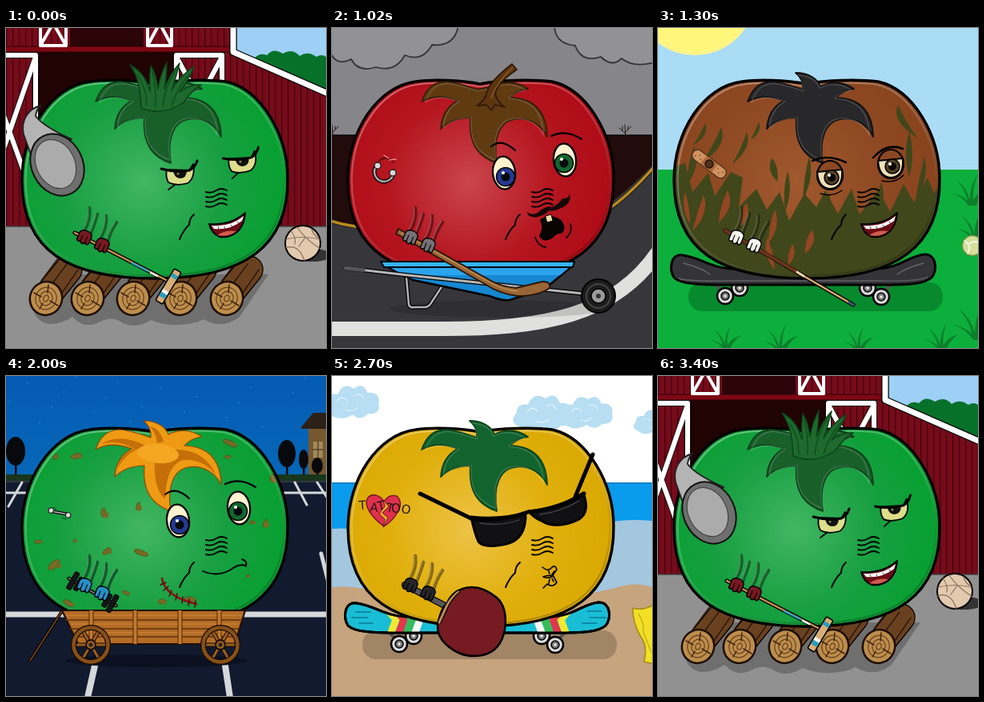
An HTML page that plays this animation: 400 by 400 pixels, repeating every 3500 ms.

```html
<!DOCTYPE html>
<html lang="en">
<head>
<meta charset="utf-8">
<title>Tomatoes</title>
<style>
html, body { margin: 0; width: 100%; height: 100%; overflow: hidden; }
svg { display: block; width: 100vw; height: 100vh; }
</style>
</head>
<body>
<script>
const BODY = 'M185 70C160 65 125 64 105 67C56 73 20 130 20 190C20 279 78 313 186 313C300 313 353 272 352 188C352 135 320 77 275 67C250 64 210 65 185 70Z';
const LEAF = 'C216 66 232 67 245 76C236 77 228 81 223 87C250 88 268 102 269 136C262 121 246 111 228 114C209 117 201 139 206 169C186 162 170 148 173 112C158 112 146 116 136 126C137 110 144 98 157 91C142 85 126 84 112 92C118 76 126 68 141 67C156 68 169 73 181 77';
const TUFT = 'M203 73' + LEAF + 'C182 69 179 62 172 56C188 56 199 63 203 73Z';
const CAP = 'M203 73' + LEAF + 'Z';

// Small SVG helpers
const path = (d, fill = 'none', stroke = '#000', w = 2, more = '') =>
  `<path d="${d}" fill="${fill}" stroke="${stroke}" stroke-width="${w}" ${more}/>`;
const fill = (d, c, more = '') => `<path d="${d}" fill="${c}" ${more}/>`;
const line = (d, w = 2, c = '#000') => path(d, 'none', c, w);
const rect = (x, y, w, h, c) => `<rect x="${x}" y="${y}" width="${w}" height="${h}" fill="${c}"/>`;
const oval = (x, y, rx, ry, c, stroke = 'none', w = 0, turn = 0) =>
  `<ellipse cx="${x}" cy="${y}" rx="${rx}" ry="${ry}" fill="${c}" stroke="${stroke}" stroke-width="${w}" transform="rotate(${turn} ${x} ${y})"/>`;
const disc = (x, y, r, c, stroke, w) => oval(x, y, r, r, c, stroke, w);
const at = (x, y, turn, s) => `<g transform="translate(${x} ${y}) rotate(${turn})">${s}</g>`;
const range = (n, f) => Array.from({ length: n }, (_, i) => f(i)).join('');
const outlined = (d, c, w) => line(d, w + 2.5) + line(d, w, c);

function body(id, light, main, edge, marks = '') {
  return `<radialGradient id="g${id}" gradientUnits="userSpaceOnUse" cx="172" cy="192" r="185">
    <stop offset="0" stop-color="${light}"/><stop offset=".55" stop-color="${main}"/><stop offset="1" stop-color="${edge}"/></radialGradient>`
    + fill(BODY, `url(#g${id})`)
    + `<g clip-path="url(#skin)">${marks}</g>`
    + `<g transform="translate(186 190) scale(.972) translate(-186 -190)">${path(BODY, 'none', 'url(#bevel)', 2.2, 'filter="url(#soft)"')}</g>`
    + path(BODY, 'none', '#000', 3.4);
}

const leaf = (d, c, dark) => path(d, c, dark, 1.8)
  + `<g transform="translate(190 105) scale(.94) translate(-190 -105)">${path(d, 'none', '#fff', 1.5, 'opacity=".16" filter="url(#soft)"')}</g>`;

const ARMS = 'M104 225Q106 240 97 254M114 233Q111 244 106 256M125 235Q126 250 117 264M138 243Q131 253 127 266';
const arms = c => line(ARMS, 4.5, '#0007') + `<g transform="translate(-1.5 -1)">${line(ARMS, 1.2, '#fff5')}</g>` + line(ARMS, 2, c);

const hand = (x, y, c) => at(x, y, 22,
  path('M-8 -4C-7 -10 5 -11 8 -5L8 3C8 8 4 8 3 5C2 9 -3 9 -3 5C-5 8 -9 7 -8 3Z', c, '#000', 1.4)
  + line('M-3 -2V5M3 -2V5', 1.1));
const hands = c => hand(98, 262, c) + hand(120, 272, c);

const nose = range(4, i => line(`M250 ${205 + i * 6}q7 2 13 -2t13 0`, 1.9));
const cheek = line('M235 233Q229 238 229 246Q222 252 217 264', 2);

const roundEye = (x, y, iris, dx, dy) => oval(x, y, 14, 20.5, '#fff3cf', '#000', 2.3, -6)
  + disc(x + dx, y + dy, 11.5, iris, '#000', 1.5) + disc(x + dx, y + dy, 5.5, '#05080c')
  + disc(x + dx - 3, y + dy - 5, 2, '#fff');
const wideEyes = roundEye(215, 181, '#233a93', 2, 5) + roundEye(291, 165, '#12672f', -1, 4)
  + line('M199 148Q212 137 229 153M274 135Q292 126 312 139', 2.2);

const grin = path('M254 245Q281 247 299 231Q298 246 290 254Q280 263 267 261Q257 257 254 245Z', '#6d0d14', '#000', 2)
  + fill('M257 247Q281 249 297 235L295 241Q280 253 260 251Z', '#fff')
  + line('M265 248l1 3M273 248l1 3M281 246l2 3M289 242l2 3', .7)
  + fill('M264 259Q275 252 288 254Q278 262 264 259Z', '#cf5c4e');

const wheel = (x, y) => disc(x, y, 10, '#ddd', '#000', 2.5) + disc(x, y, 5, '#777', '#000', 1.5) + disc(x, y, 1.8, '#eee');
const DECK = 'M31 284C16 281 13 302 20 312C28 320 50 321 88 321H278C315 321 333 320 342 312C350 303 348 282 333 283C313 285 304 299 275 301H92C66 300 53 287 31 284Z';
function board(c, shade, trim) {
  return `<rect x="38" y="318" width="318" height="36" rx="17" fill="${shade}"/>`
    + line('M72 321l10 10h14l10-10M257 321l10 10h14l10-10', 4, '#555')
    + wheel(102, 325) + wheel(262, 325) + wheel(279, 336)
    + wheel(84, 335) + path(DECK, c, '#000', 3) + trim;
}

function barn() {
  const slats = range(51, i => rect(i * 8, 0, 1.3, 248, '#430510'));
  const log = x => outlined(`M${x + 3} 333L${x + 28} 302`, '#6a4120', 33)
    + line(`M${x - 6} 316l24 -32M${x + 6} 322l20 -27M${x + 18} 334l22 -32`, 1.4, '#2b1708')
    + oval(x, 338, 20, 21, '#bd8d4c', '#1c0e04', 2.5, 25)
    + [13, 8, 3].map(r => oval(x, 338, r, r + 1, 'none', '#65401d', 1.2, 25)).join('')
    + line(`M${x - 15} 331l9 5M${x + 5} 341l10 6M${x + 3} 321l-1 10M${x - 8} 351l4 -7`, 1.5, '#3e230e');
  const frame = (x, w) => path(`M${x} -8H${x + w}V22H${x}ZM${x} 22L${x + w / 2} -6L${x + w} 22`, 'none', '#fff', 4);
  const door = 'M0 34H37V248M37 36L-2 148M-2 112L40 228M213 248V34H270V248M214 38L269 140M269 38L214 140';
  const spikes = fill('M169 100C168 78 166 62 155 46C171 55 176 66 180 79Q179 62 181 47Q188 58 190 76Q193 58 201 43Q201 59 198 76Q205 57 217 44Q213 60 207 78Q217 60 235 48Q229 64 217 80Q230 70 244 71Q231 79 222 93Q196 111 169 100Z', '#1d6a2c', 'stroke="#0c4219" stroke-width="1.5"')
    + line('M176 97Q176 77 165 59M187 98Q188 74 183 55M196 98Q198 75 211 55M207 97Q214 75 229 58', 1.3, '#0f481d');
  // Heavy lid that dips towards the nose and rises at the outer end
  const squint = (x, y, turn) => at(x, y, turn,
    path('M-15 -6L13 -5L18 -13Q21 4 11 11Q-3 15 -13 10Q-17 3 -15 -6Z', '#dddd8b', '#000', 1.8)
    + fill('M-7 -5H10Q10 5 1 5Q-6 4 -7 -5Z', '#111') + disc(-1, -1, 1.5, '#898a4c')
    + line('M-22 -7Q-4 -2 13 -5Q20 -8 23 -17', 3) + line('M-13 19l8 -6', 1.8));
  return rect(0, 0, 400, 400, '#760b1a') + slats
    + rect(80, 0, 92, 23, '#2b0508') + rect(0, 23, 282, 7, '#7e0713') + rect(41, 30, 172, 218, '#200303')
    + line('M0 23H282M0 30H282', 1, '#2a0409')
    + frame(43, 32) + frame(177, 30)
    + line(door, 8, '#111') + line(door, 6, '#fff')
    + fill('M284 0H400V80L284 31Z', '#9dd0f4')
    + fill('M308 44Q313 29 326 34Q334 24 346 32Q358 25 367 35Q377 28 388 36Q396 31 402 38V84Z', '#07712a')
    + outlined('M284 -5V30L405 83', '#fff', 7)
    + rect(0, 248, 400, 152, '#919191') + line('M0 248H400', 1.5, '#3c3c3c')
    + fill('M34 342Q32 366 54 370Q70 370 83 361Q99 378 118 367Q132 360 143 367Q161 378 181 365Q197 372 216 371Q236 370 247 364Q270 378 292 361L328 308H70Z', '#6f6f6f')
    + [50, 102, 159, 218, 276].map(log).join('')
    + oval(383, 284, 23, 8, '#333')
    + disc(371, 269, 22, '#e3c9ae', '#000', 2)
    + line('M350 264Q370 259 392 264M349 275Q366 269 373 291M364 249Q374 264 393 276M356 253Q363 262 361 270M374 262L366 273M382 251Q384 259 390 262', 1.2, '#85705c')
    + body('a', '#43b663', '#179f41', '#05a02f')
    + leaf(CAP, '#195f2a', '#0c4219') + spikes
    + path('M43 97C28 101 18 115 22 133L31 158L82 139C62 130 45 121 37 110Q38 102 43 97Z', '#b4b4b4', '#222', 2)
    + oval(64, 171, 32, 40, '#6f6f6f', '#111', 2, -26) + oval(62, 170, 24, 32, '#ababab', '#444', 1.2, -26)
    + arms('#126c2a')
    + squint(216, 183, 0) + squint(294, 168, -5)
    + nose + cheek + grin
    + outlined('M86 256L200 315', '#c69450', 2.5) + line('M158 294l20 10', 2.5, '#2ca3c8') + line('M181 306l8 4', 2.5, '#fff')
    + at(203, 323, -59, `<rect x="-23" y="-5" width="46" height="10" rx="2" fill="#d8ae78" stroke="#000" stroke-width="1.6"/>`
      + rect(-16, -4, 6, 8, '#279ebd') + rect(-10, -4, 4, 8, '#fff') + rect(12, -4, 5, 8, '#279ebd'))
    + hands('#781820');
}

function road() {
  const cloud = d => path(d, '#929196', '#343438', 1.8);
  const twig = (x, y) => line(`M${x} ${y}l-1 -13M${x} ${y - 4}l7 -7M${x} ${y - 2}l-8 -7M${x + 3} ${y - 7}l0 -4M${x - 4} ${y - 6}l0 -5`, 1, '#211513');
  const verge = 'M-2 241Q25 250 60 250M340 230Q370 211 403 173';
  const leg = 'M93 312L96 346Q97 350 103 349H117Q122 348 125 342L142 316';
  return rect(0, 0, 400, 400, '#85858a')
    + cloud('M-3 27Q3 49 24 39Q33 56 55 49Q79 56 91 34Q113 43 125 21Q153 24 158 -3H-3Z')
    + cloud('M278 -3Q279 20 304 22Q312 44 336 36Q350 50 362 38Q376 50 403 43V-3Z')
    + rect(0, 134, 400, 130, '#210b0b') + line('M0 134H400', 1.5, '#0b0505') + twig(1, 134) + twig(367, 134)
    + fill('M0 241Q30 250 60 250H300Q352 222 400 172V400H0Z', '#36363b')
    + line(verge, 5, '#111') + line(verge, 3.5, '#b88a20')
    + line('M-5 376H130C266 377 354 359 408 279', 18, '#e0e0df')
    + oval(210, 351, 138, 11, '#0002')
    + body('b', '#cb464c', '#b51620', '#ae0a15')
    + leaf(CAP, '#603a10', '#352008')
    + path('M181 97Q192 91 194 79Q197 67 225 45L231 52Q207 68 204 82Q207 93 216 99L204 96L199 103L193 96Z', '#5c3510', '#2e1a06', 1.8)
    + line('M199 88Q203 72 226 49', 1.2, '#916028')
    + line('M59 166A12 12 0 0 1 77 168', 2, '#5b060c') + outlined('M56 172A12 12 0 1 0 77 179', '#aaa', 2.5)
    + disc(57, 172, 4, '#d9d9d9', '#222', 1.3) + disc(76, 181, 4, '#d9d9d9', '#222', 1.3) + line('M65 159l6 4M72 165l8 -1', 1.4, '#f0888b')
    + arms('#7f1018') + wideEyes + nose + cheek
    + fill('M244 230Q250 235 257 231Q268 221 275 224Q284 220 288 213Q296 214 297 207Q300 220 286 225Q277 230 272 228Q259 239 250 236Q244 235 244 230Z', '#160808')
    + path('M261 240Q273 232 286 241Q293 251 286 256Q280 255 275 262Q265 268 260 260Q266 249 261 240Z', '#090304', '#000', 2)
    + path('M267 235l7 -2 2 8 -7 2Z', '#f1ddb0', '#000', 1)
    + line('M254 262Q258 273 267 274M293 262Q301 255 298 245', 1.8)
    + outlined(leg, '#b5b5b5', 2.5)
    + path('M66 297H301L266 326L222 340Q211 341 197 335L101 315Z', '#1687d0', '#000', 2.5)
    + fill('M72 299H297L285 309H90Z', '#2ba4ed')
    + path('M61 292H303L301 299H65Z', '#35b4f4', '#000', 2)
    + outlined('M17 300L95 309L333 334', '#b7b7b7', 3) + line('M17 300L39 302.5', 5, '#555')
    + disc(333, 335, 21, '#1c1c1d', '#000', 2) + disc(333, 335, 15, 'none', '#454545', 2) + disc(333, 335, 9, '#9b9b9b', '#000', 1.5) + disc(333, 335, 3, '#333')
    + path('M83 251L197 315Q210 323 230 325L263 317Q274 317 272 325Q258 335 232 335Q211 333 191 320L80 257Z', '#986535', '#2b1607', 2)
    + line('M87 256L198 318Q215 328 232 329', 1.2, '#c99355')
    + hands('#777176');
}

function lawn() {
  const tuft = (x, y, s) => `<g transform="translate(${x} ${y}) scale(${s})">`
    + fill('M0 0Q-8 -13 -25 -18Q-10 -15 -1 -7Q-6 -25 -17 -36Q-2 -25 2 -8Q2 -29 13 -43Q5 -25 7 -8Q14 -21 31 -25Q16 -15 11 0Z', '#0c7f2b') + '</g>';
  const streak = (x, y, h, w, lean) => `M${x} ${y}Q${x - w} ${y + h / 2} ${x - lean} ${y + h}Q${x + w} ${y + h / 2} ${x} ${y}`;
  const green = [[79, 124, 45, 9, 25], [59, 119, 28, 6, 15], [111, 130, 40, 7, 18], [126, 118, 22, 5, 10], [45, 147, 48, 9, 8], [143, 162, 30, 9, -6], [162, 179, 50, 7, 3], [189, 160, 55, 7, 8], [300, 96, 42, 9, -25], [314, 130, 56, 8, 0], [279, 193, 42, 8, 7], [333, 160, 55, 7, 11], [213, 205, 30, 6, 3]];
  const rust = [[57, 208, 46, 8, 14], [87, 203, 40, 10, 11], [110, 218, 30, 8, 6], [146, 227, 42, 8, 8], [192, 252, 30, 9, 8], [137, 262, 40, 8, -9], [168, 270, 27, 7, 5], [34, 205, 40, 6, -6]];
  const marks = fill('M0 320V180L34 169L43 205L63 181L71 210L91 180L106 187L101 224L123 201L136 227L152 205L164 241L183 207L198 224L209 203L225 232L242 201L252 233L276 202L290 230L307 195L320 218L337 187L345 207L360 180V320Z', '#40471a')
    + fill(green.map(a => streak(...a)).join(''), '#40471a') + fill(rust.map(a => streak(...a)).join(''), '#934623');
  const sly = (x, y) => oval(x, y, 16, 18, '#8b4824', '#000', 2.2) + path(`M${x - 16} ${y - 4}L${x + 15} ${y - 7}Q${x + 17} ${y + 16} ${x} ${y + 17}Q${x - 15} ${y + 16} ${x - 16} ${y - 4}Z`, '#eee0b8', '#000', 2.2)
    + disc(x + 2, y + 3, 9, '#544127', '#000', 1.5) + disc(x + 2, y + 3, 5, '#080604') + disc(x - 1, y, 2, '#fff');
  return rect(0, 0, 400, 180, '#abdcf6') + disc(46, -42, 76, '#fff48a') + disc(46, -42, 72, '#fff67c')
    + rect(0, 177, 400, 223, '#0caf3c')
    + tuft(388, 222, .9) + tuft(394, 266, .9) + tuft(82, 402, .7) + tuft(150, 405, .8) + tuft(248, 404, .7) + tuft(351, 403, .8) + tuft(394, 390, 1.1)
    + disc(393, 272, 12.5, '#d5e09a', '#799047', 1.5) + line('M383 266Q393 272 387 282M388 270Q397 264 403 270', 1.4, '#fff')
    + board('#343438', '#078a2d', line('M32 294Q55 300 65 308M332 294Q309 300 299 308', 1.3, '#66666a') + line('M26 313Q35 317 90 316H276Q329 317 337 311', 1.4, '#626266'))
    + body('c', '#a1592e', '#8f4a23', '#88431d', marks)
    + leaf(TUFT, '#28282b', '#111113')
    + at(64, 170, 37, '<rect x="-25" y="-7" width="50" height="14" rx="7" fill="#cf935f" stroke="#563318" stroke-width="1.5"/>'
      + rect(-9, -6, 18, 12, '#a96c3f') + disc(0, 0, 5, '#533018', '#241308', 1.5) + range(6, i => disc(i < 3 ? -20 + i * 4 : 12 + (i - 3) * 4, i % 2 ? -2 : 2, .8, '#704322')))
    + arms('#343a16') + sly(215, 184) + sly(291, 170)
    + line('M193 166Q212 157 235 168M269 162Q286 143 306 151', 2.5) + line('M203 207Q217 212 230 203M280 191Q296 195 307 184', 1.4)
    + nose + cheek + grin
    + outlined('M84 253L244 346', '#d8ad6d', 2.5) + line('M84 253L174 305', 4, '#6b351e') + line('M174 305l8 5', 3, '#e8d4a9') + line('M239 343l5 3', 3, '#365b79')
    + hands('#f4f3ed');
}

function lot() {
  const tree = (x, y, rx, ry) => rect(x - 1, y, 2.5, 124 - y, '#080808') + oval(x, y, rx, ry, '#08090c');
  const spots = [[88, 100, 7, 3, -15], [62, 101, 4, 2, -50], [146, 109, 8, 3, -35], [280, 84, 9, 3, 25], [277, 101, 4, 2, 0], [333, 128, 3, 5, 0], [308, 183, 4, 2, 0], [324, 184, 2, 5, 20], [122, 171, 3, 6, 0], [165, 163, 2, 5, 15], [126, 219, 6, 3, -35], [169, 221, 9, 3, 20], [60, 236, 9, 4, -40], [40, 207, 5, 2, 0], [150, 271, 5, 2, 20], [195, 282, 5, 3, 0], [86, 206, 2, 2, 0], [78, 284, 7, 3, 30], [230, 279, 7, 3, 5], [302, 250, 2, 2, 0]];
  const marks = spots.map(([x, y, rx, ry, a]) => oval(x, y, rx, ry, '#786a25', '#4b5f22', 1, a) + disc(x + rx * .7, y + ry * .4, ry * .7, '#786a25')).join('');
  const cart = (x, y) => range(6, i => at(x, y, i * 60 + 30, line('M0 0V-20', 5, '#170b04') + line('M0 0V-20', 3, '#9a6020')))
    + disc(x, y, 21.5, 'none', '#170b04', 7) + disc(x, y, 21.5, 'none', '#875019', 4.5)
    + disc(x, y, 6, '#9a6020', '#170b04', 1.8) + disc(x, y, 2.5, '#222');
  const stars = range(22, i => disc((i * 83 + 27) % 400, (i * 37 + 9) % 68, .6, '#7eb5e4'));
  const plate = (x, h) => `<rect x="${x - 3}" y="${-h}" width="6" height="${h * 2}" rx="2" fill="#151519" stroke="#000" stroke-width="1"/>`;
  return rect(0, 0, 400, 125, 'url(#night)') + stars
    + tree(12, 94, 12, 18) + tree(351, 97, 11, 17) + tree(372, 104, 6, 12)
    + fill('M378 63H400V124H378Z', '#75582f') + fill('M369 64L384 46H400V66H369Z', '#2c2018') + rect(384, 82, 12, 20, '#a38a59') + line('M390 82V102M384 92H396', 1, '#34271e')
    + tree(389, 112, 7, 10)
    + rect(0, 123, 400, 10, '#17361b') + rect(0, 131, 400, 269, '#121a2f') + line('M0 132H400', 1.5, '#39424e')
    + line('M20 133L3 163M0 146H28M361 133L376 161M348 146H400M389 133L402 153', 3, '#d4d8d9') + line('M394 222L404 262', 5, '#d4d8d9')
    + line('M0 298H74M292 298H400', 7, '#d4d8d9') + line('M111 362L102 402M274 362L280 402', 8, '#d4d8d9')
    + oval(188, 356, 114, 8, '#0b1120')
    + body('d', '#43b663', '#179f41', '#05a02f', marks)
    + path(TUFT, '#ee9a14', '#8c4a05', 1.2)
    + fill('M119 85Q143 70 176 88Q152 92 139 116Q143 98 160 91Q140 79 119 85ZM180 63Q193 66 197 82L189 84Q188 72 180 63ZM212 92Q248 92 263 124Q244 101 218 106Q200 115 199 154Q184 140 186 108Q194 97 212 92Z', '#c56f08')
    + oval(190, 97, 26, 12, '#f5a623', 'none', 0, 5)
    + at(67, 171, 10, outlined('M-10 0H10', '#bbb', 1.5) + disc(-11, -1, 3.2, '#dedede', '#222', 1.2) + disc(11, 1, 3.2, '#dedede', '#222', 1.2))
    + line('M60 164l3 4M70 177l5 2', 1.5, '#056729')
    + arms('#08602d') + wideEyes + nose + cheek
    + line('M246 244Q264 252 281 242Q291 234 300 237M295 229Q302 231 300 238', 1.9)
    + line('M195 253Q199 276 238 285', 2.6, '#8b1018') + line('M193 261l7 -3M197 268l6 -5M204 275l3 -7M212 280l2 -8M220 284l1 -8M228 287l1 -8M236 289l1 -8', 1.5, '#51080d')
    + outlined('M70 294L30 356', '#85461c', 1.5)
    + path('M70 293H299L286 335H90Z', '#b46b25', '#1e0e04', 2.2)
    + line('M75 305H295M80 316H291M85 326H289', 1.6, '#5d320c') + line('M76 299H295M82 310H290M86 321H288', 1.2, '#d08a3d')
    + [104, 159, 215, 264].map(x => rect(x, 293, 5, 42, '#c27a30') + line(`M${x} 293V335M${x + 5} 293V335`, 1, '#512609')).join('')
    + cart(106, 336) + cart(268, 336)
    + at(108, 270, 30, outlined('M-34 0H34', '#777', 2) + plate(-28, 12) + plate(-20, 9) + plate(21, 9) + plate(29, 12))
    + hands('#288dc5');
}

function beach() {
  const puff = (x, y, s) => `<g transform="translate(${x} ${y}) scale(${s})">` + fill('M-30 15Q-45 9 -34 -3Q-34 -16 -19 -14Q-12 -32 4 -22Q17 -32 23 -16Q42 -17 39 0Q43 14 24 14Q13 25 2 15Q-16 26 -30 15Z', '#b7def2')
    + line('M-20 -5Q-13 -13 -6 -5M5 -12Q13 -17 18 -8M-8 8Q2 12 9 5', 1.5, '#dff2fb') + '</g>';
  const chevrons = `<clipPath id="deck"><path d="${DECK}"/></clipPath><g clip-path="url(#deck)">`
    + ['#f0e92f', '#e4364b', '#36bd57', '#f7f7ef'].map((c, i) => line(`M${57 + i * 10} 280l23 24 -9 25M${309 - i * 10} 280l-23 24 9 25`, 9, c)).join('')
    + line('M30 295h18M25 302h20M34 309h17M319 294h18M322 302h20M313 309h18', 1.3, '#087992') + '</g>' + path(DECK, 'none', '#000', 3);
  const letters = [['T', 34, 167, -5], ['A', 47, 169, 5], ['T', 58, 168, -13], ['T', 67, 169, 12], ['O', 74, 171, 0], ['O', 86, 171, 8]]
    .map(([c, x, y, a]) => `<text x="${x}" y="${y}" transform="rotate(${a} ${x} ${y})">${c}</text>`).join('');
  return rect(0, 0, 400, 400, '#fff') + puff(24, 35, .88) + puff(263, 49, .95) + puff(317, 48, .85) + puff(402, 59, .65)
    + rect(0, 133, 400, 130, '#0a9bec') + line('M0 134H400', 1.5, '#077ac0')
    + fill('M0 191Q36 187 64 209L310 195Q347 176 400 181V275H0Z', '#a3c7df')
    + fill('M0 264Q36 260 70 276Q180 295 304 275Q340 269 360 263Q381 257 400 264V400H0Z', '#c5a47e')
    + path('M376 290Q388 294 402 286V360L390 357Q395 337 386 326Q376 309 376 290Z', '#f2df26', '#a28d15', 1.5) + line('M383 297Q391 310 389 320L399 345', 1.3, '#c4ad15')
    + board('#19bed6', '#a18565', chevrons)
    + body('e', '#eec347', '#e0af0c', '#d9a700')
    + leaf(TUFT, '#13632e', '#0a441c')
    + path('M65 188Q46 174 43 160Q43 147 55 149Q62 151 65 157Q71 147 81 150Q90 159 81 172Q75 182 65 188Z', '#df304d', '#711128', 1.3)
    + path('M64 155l7 8 -8 8 7 6 -6 12 2 -10 -7 -7 7 -9Z', '#e1b020', '#711128', 1)
    + `<g font-family="'DejaVu Sans', sans-serif" font-size="15" fill="#251611">${letters}</g>`
    + arms('#94700a')
    + line('M110 147L178 180M304 151L326 98', 5)
    + path('M174 176Q209 180 242 171Q243 204 218 210Q190 216 183 207Q178 196 174 176Z', '#111113', '#000', 3)
    + path('M246 169Q285 165 314 146Q325 175 302 182Q277 191 262 181Q252 177 246 169Z', '#111113', '#000', 3)
    + line('M174 178Q211 183 245 170Q285 166 315 147', 5) + line('M185 184Q212 188 234 180M260 173Q286 170 309 156', 1.3, '#454549')
    + nose + cheek
    + line('M263 239Q270 245 274 240Q279 235 281 242L276 249L281 258Q276 265 269 260L264 265M264 251Q271 248 276 250Q270 254 264 251M270 242l2 5M278 244l-3 4M271 259l1 -5M277 257l-2 -4', 1.6)
    + outlined('M91 261L143 288', '#56565a', 6)
    + path('M132 311Q136 291 143 285Q150 270 163 266Q184 259 206 277Q220 290 216 317Q211 344 188 349Q163 354 143 336Q131 325 132 311Z', '#761b22', '#000', 2.5)
    + line('M134 308Q139 297 144 286Q150 276 158 270', 3, '#b98b55') + line('M136 309Q141 298 146 287Q152 276 160 270', 1.2)
    + hands('#252528');
}

const scenes = [barn, road, lawn, lot, beach];
document.body.innerHTML = `<svg viewBox="0 0 400 400" stroke-linecap="round" stroke-linejoin="round">
  <defs>
    <clipPath id="skin"><path d="${BODY}"/></clipPath>
    <filter id="soft"><feGaussianBlur stdDeviation=".8"/></filter>
    <linearGradient id="bevel" x2=".6" y2="1"><stop stop-color="#fff" stop-opacity=".4"/><stop offset=".5" stop-color="#fff" stop-opacity=".2"/><stop offset="1" stop-color="#000" stop-opacity=".2"/></linearGradient>
    <linearGradient id="night" x2="0" y2="1"><stop stop-color="#045bb2"/><stop offset="1" stop-color="#0767b8"/></linearGradient>
  </defs>${scenes.map(draw => `<g display="none">${draw()}</g>`).join('')}</svg>`;

const layers = [...document.querySelectorAll('svg > g')];
const STEPS = [[600, 0], [1300, 1], [2000, 2], [2700, 3], [3400, 4], [3500, 0]];
const start = performance.now();
let shown = -1;
function tick() {
  const t = (performance.now() - start) % 3500;
  const next = STEPS.find(([end]) => t < end)[1];
  if (next !== shown) {
    layers.forEach((g, i) => g.setAttribute('display', i === next ? 'inline' : 'none'));
    shown = next;
  }
  requestAnimationFrame(tick);
}
tick();
</script>
</body>
</html>
```
